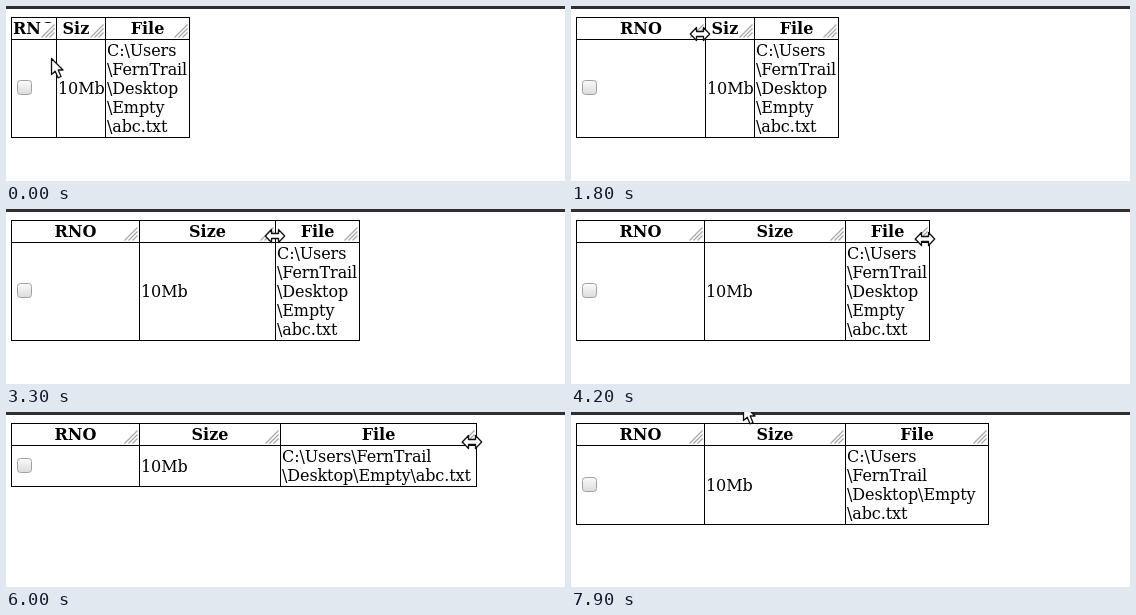
Recreate the animation shown at these times as an HTML page. Size 559 by 175 pixels, loop 8 s.

```html
<!DOCTYPE html>
<html lang="en">
<head>
<meta charset="utf-8">
<title>Resizable table columns</title>
<style>
  html, body { margin: 0; width: 100%; height: 100%; overflow: hidden; background: #fff; }
  body { position: relative; font: 16px/19px "DejaVu Serif", serif; color: #000; }
  .bar { position: absolute; left: 0; top: 0; width: 100%; height: 3px; background: #302e33; }
  .cell { position: absolute; top: 33px; box-sizing: border-box; padding: 1px; border: 1px solid #000;
          display: flex; align-items: center; white-space: nowrap; letter-spacing: -.1px; }
  .head { top: 11px; height: 23px; justify-content: center; font-weight: bold;
          letter-spacing: 0; overflow: hidden; }
  .file { display: block; white-space: normal; }
  .head svg { position: absolute; right: 1px; bottom: 1px; background: #fff; }
  .box { box-sizing: border-box; width: 15px; height: 15px; margin: -2px 0 0 4px;
         border: 1px solid #a0a0a0; border-radius: 3.5px; background: linear-gradient(#fafafa, #dcdcdc); }
  #pointer { position: absolute; left: 0; top: 0; overflow: visible; }
</style>
</head>
<body>
<div class="bar"></div>
<div class="cell head">RNO</div>
<div class="cell head">Size</div>
<div class="cell head">File</div>
<div class="cell body"><div class="box"></div></div>
<div class="cell body">10Mb</div>
<div class="cell file">C:\Users<wbr>\FernTrail<wbr>\Desktop<wbr>\Empty<wbr>\abc.txt</div>
<svg id="pointer" width="1" height="1">
  <path fill="#fff" stroke="#111" stroke-width="1.3" stroke-linejoin="round"/>
</svg>
<script>
const LOOP = 8000, STEP = 100, LAG = 50, LEFT = 5;
const ARROW = 'M.5 .5V16.5L4.2 13.2L7 19.8L10 18.5L7.2 12H12Z';
const RESIZE = 'M-9.7 0L-3.5 -6.5V-2.5H3.5V-6.5L9.7 0L3.5 6.5V2.5H-3.5V6.5Z';

const drags = [
  { col: 0, from: 1150, to: 1800, width: 129 },
  { col: 0, from: 1800, to: 1900, width: 128 },
  { col: 1, from: 2800, to: 3400, width: 141 },
  { col: 2, from: 4500, to: 6000, width: 196 },
  { col: 2, from: 6800, to: 7200, width: 143 }
];
const grip = col => edges => edges[col] - 4;
const moves = [
  { from: 100, to: 600, x: grip(0), y: 28 },
  { from: 2000, to: 2500, x: grip(1), y: 27 },
  { from: 3700, to: 4200, x: grip(2), y: 30 },
  { from: 7600, to: 7900, x: () => 172, y: -8 }
];

// Eased-out progress of an action, 0 to 1
function progress(t, { from, to }) {
  const p = Math.min(1, Math.max(0, (t - from) / (to - from)));
  return 1 - (1 - p) ** 1.66;
}

function widthsAt(t) {
  const widths = [45, 49, 84];
  for (const d of drags) widths[d.col] += (d.width - widths[d.col]) * progress(t, d);
  return widths.map(Math.round);
}

function edgesOf(widths) {
  let x = LEFT;
  return widths.map(w => x += w);
}

function pointerAt(t, edges) {
  let x = 45, y = 52;
  for (const m of moves) {
    const p = progress(t, m);
    x += (m.x(edges) - x) * p;
    y += (m.y - y) * p - 4 * Math.sin(Math.PI * p);
  }
  return [Math.round(x), Math.round(y)];
}

const heads = [...document.querySelectorAll('.head')];
const file = document.querySelector('.file');
const cells = [...document.querySelectorAll('.body'), file];
const pointer = document.querySelector('#pointer path');

const hatch = [1.5, 5.5, 9.5].map(a => `M${a} 14.5L14.5 ${a}`).join('');
for (const head of heads) {
  head.insertAdjacentHTML('beforeend',
    `<svg width="15" height="15"><path d="${hatch}" stroke="#a6a6a6" stroke-width="1.2"/></svg>`);
}

function draw(t) {
  const widths = widthsAt(t), edges = edgesOf(widths);
  widths.forEach((w, i) => {
    for (const el of [heads[i], cells[i]]) {
      el.style.left = edges[i] - w + 'px';
      el.style.width = w + 1 + 'px';
    }
  });
  cells[0].style.height = cells[1].style.height = file.offsetHeight + 'px';

  // The columns trail slightly behind the pointer
  const ahead = edgesOf(widthsAt(t + LAG));
  const [x, y] = pointerAt(t, ahead);
  const onGrip = y >= 17 && y < 32 && ahead.some(e => x > e - 16 && x < e);
  pointer.setAttribute('d', onGrip ? RESIZE : ARROW);
  pointer.setAttribute('transform', `translate(${x} ${y})`);
}

const start = performance.now();
function tick() {
  const t = (performance.now() - start) % LOOP;
  draw(Math.floor(t / STEP) * STEP);
  requestAnimationFrame(tick);
}
tick();
</script>
</body>
</html>
```
